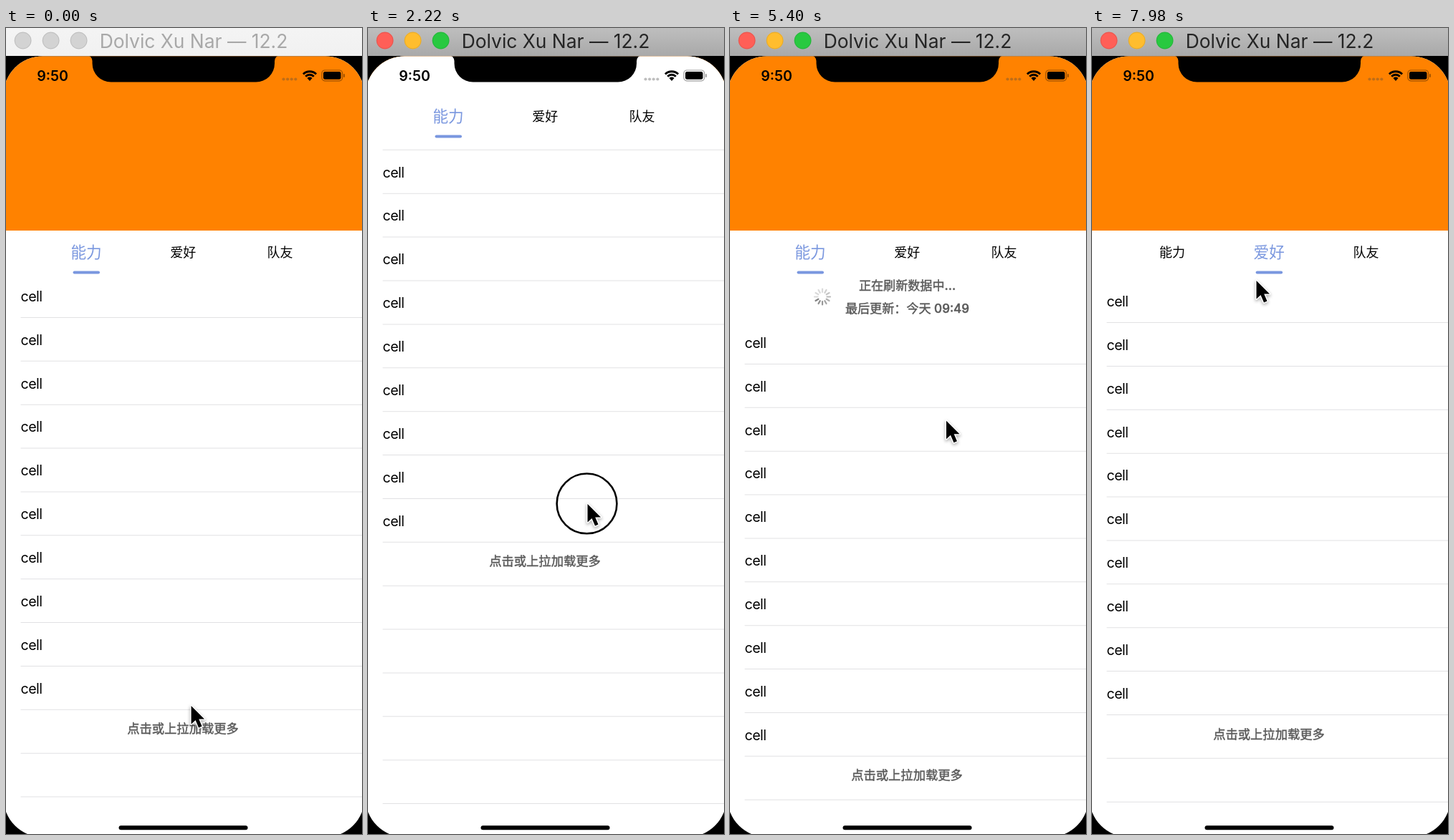
Recreate the animation shown at these times as an HTML page with a canvas. Size 497 px wide and 1126 px high, loop 8 s.

```html
<!DOCTYPE html>
<html lang="zh">
<meta charset="utf-8">
<style>
html, body { margin: 0; width: 100%; height: 100%; overflow: hidden; background: #000; }
canvas { display: block; }
</style>
<canvas id="stage" width="497" height="1126"></canvas>
<script>
const c = document.getElementById('stage').getContext('2d');
const LOOP = 8000, W = 497, H = 1126, ROW = 60.88;
const NAV = 93, HEAD = 283, FOLD = HEAD - NAV, TABS = 60.5, PULL = 65;
const LATIN = 'Inter, "Noto Sans CJK SC", "Noto Sans CJK", sans-serif';
const HAN = '"Noto Sans CJK SC", "Noto Sans CJK", Inter, sans-serif';
const BLUE = '#7a97df', GREY = '#5a5a5a';

// Keys: [time, values...]; a trailing 'ease' smooths the way into that key.
const scrollKeys = [
  [0, 0], [400, 0], [1020, 66], [2220, 234], [2400, 238], [2800, FOLD, 'ease'],
  [3250, FOLD], [3540, 124.6], [4100, 0, 'ease'], [4250, 0], [4620, -43],
  [5000, -70], [5100, -70], [5350, -PULL, 'ease'], [5750, -PULL], [6100, 0, 'ease'],
  [6500, 0], [6745, -PULL, 'ease'], [7250, -PULL], [7250, 0], [7500, -PULL, 'ease'],
  [7700, -PULL], [8054, 0, 'ease']
];
const tabKeys = [[0, 0], [6500, 0], [6720, 2, 'ease'], [7250, 2], [7470, 1, 'ease']];
const mouseKeys = [
  [0, 258, 946], [400, 282, 949], [1020, 291, 883], [2220, 306, 664], [2400, 308, 650],
  [3200, 320, 291, 'ease'], [3540, 325, 356], [4000, 318, 480], [4250, 308, 413, 'ease'],
  [4620, 305, 499], [5000, 300, 553], [5300, 300, 553], [6400, 361, 330, 'ease'],
  [6800, 361, 330], [7150, 240, 322, 'ease'], [7400, 240, 322], [7900, 229, 352, 'ease']
];
const presses = [[350, 2400], [3220, 4050], [4250, 5080], [6430, 6520], [7180, 7270]];
const refreshes = [[5080, 6100], [6500, 7250], [7250, 8054]];

const within = (spans, t) => spans.some(([a, b]) => t >= a && t < b);
const clamp = (v, lo, hi) => Math.min(hi, Math.max(lo, v));

function at(keys, t, n = 1) {
  const i = keys.findIndex(k => k[0] > t);
  if (i < 0) return keys[keys.length - 1][n];
  const a = keys[i - 1], b = keys[i];
  let u = (t - a[0]) / (b[0] - a[0]);
  if (b[b.length - 1] === 'ease') u = u * u * (3 - 2 * u);
  return a[n] + (b[n] - a[n]) * u;
}

function rect(x, y, w, h, color, r = 0) {
  c.fillStyle = color;
  c.beginPath();
  c.roundRect(x, y, w, h, r);
  c.fill();
}

function disc(x, y, r, color) {
  c.fillStyle = color;
  c.beginPath();
  c.arc(x, y, r, 0, 7);
  c.fill();
}

function ring(x, y, r, width, color) {
  c.strokeStyle = color;
  c.lineWidth = width;
  c.beginPath();
  c.arc(x, y, r, 0, 7);
  c.stroke();
}

// `bolder` thickens the strokes of the letters by that many pixels.
function text(s, x, mid, size, color = '#000', { font = HAN, weight = 400, align = 'center', gap = 0, bolder = 0 } = {}) {
  const y = mid + size * 0.37;
  c.font = `${weight} ${size}px ${font}`;
  c.letterSpacing = gap + 'px';
  c.textAlign = align;
  c.fillStyle = c.strokeStyle = color;
  c.fillText(s, x, y);
  if (bolder) {
    c.lineWidth = bolder;
    c.strokeText(s, x, y);
  }
}

function titleBar(active) {
  const g = c.createLinearGradient(0, 0, 0, 39);
  g.addColorStop(0, active ? '#bebebe' : '#f4f4f4');
  g.addColorStop(1, active ? '#a9a9a9' : '#f1f1f1');
  rect(0, 0, W, 39, g);
  ['#ff5f57', '#ffbd2e', '#28c940'].forEach((color, i) => {
    const x = 23.6 + 39 * i;
    disc(x, 17.5, 11.9, active ? color : '#d3d3d3');
    ring(x, 17.5, 11.4, 1, 'rgba(0,0,0,.1)');
  });
  text('Dolvic Xu Nar — 12.2', 262, 18.5, 26.4, active ? '#252525' : '#a8a8a8', { font: LATIN });
}

function spinner(x, y, t) {
  const step = Math.floor(t / 83);
  c.lineWidth = 2.2;
  c.lineCap = 'round';
  for (let i = 0; i < 12; i++) {
    const a = i * Math.PI / 6, age = (step - i + 1200) % 12;
    c.strokeStyle = `rgba(110,110,110,${0.85 - Math.min(age, 8) * 0.075})`;
    c.beginPath();
    c.moveTo(x + 6.5 * Math.cos(a), y + 6.5 * Math.sin(a));
    c.lineTo(x + 11 * Math.cos(a), y + 11 * Math.sin(a));
    c.stroke();
  }
  c.lineCap = 'butt';
}

function arrow(x, y, up) {
  c.save();
  c.translate(x, y);
  if (up) c.rotate(Math.PI);
  c.strokeStyle = '#606060';
  c.lineWidth = 2;
  c.stroke(new Path2D('M0-14V12M-8 5L0 13L8 5'));
  c.restore();
}

function list(top, t, pull) {
  for (let i = 0, y = top; y < H; i++, y += ROW) {
    rect(20.5, y + ROW - 0.5, W, 1, '#e1e1e3');
    if (i < 10) text('cell', 20.5, y + 31, 19.6, '#000', { font: LATIN, align: 'left', gap: -0.5 });
  }
  const note = { font: LATIN, weight: 500, bolder: 0.45 };
  text('点击或上拉加载更多', 247, top + 635.5, 17.3, GREY, note);
  if (pull <= 0) return;

  const busy = within(refreshes, t), ready = pull >= PULL;
  const state = busy ? '正在刷新数据中...' : ready ? '松开立即刷新' : '下拉可以刷新';
  text(state, 247.5, top - 49, 17.1, GREY, note);
  text('最后更新：今天 ' + (t < 5750 ? '09:49' : '09:50'), 247.5, top - 16.5, 17.1, GREY, note);
  if (busy) spinner(129, top - 33, t);
  else arrow(129, top - 32.5, ready);
}

function tabBar(y, pos, active) {
  rect(0, y, W, TABS, '#fff');
  ['能力', '爱好', '队友'].forEach((name, i) => {
    const on = i === active;
    text(name, 112 + 135.2 * i, y + 30.5, on ? 21.6 : 18, on ? BLUE : '#000');
  });
  rect(93.5 + 135.1 * pos, y + 56.6, 37.5, 4, BLUE, 2);
}

function notch() {
  c.fillStyle = '#000';
  c.beginPath();
  c.moveTo(112, 38);
  c.arcTo(120.5, 39, 120.5, 48, 8);
  c.arcTo(120.5, 75.5, 148, 75.5, 26);
  c.arcTo(375, 75.5, 375, 48, 26);
  c.arcTo(375, 39, 384, 38, 8);
  c.lineTo(384, 38);
  c.fill();
}

function statusBar() {
  text('9:50', 65, 67, 19.6, '#000', { font: LATIN, weight: 600 });
  for (let i = 0; i < 4; i++) disc(387.5 + 5.6 * i, 71.5, 2.1, 'rgba(70,70,70,.35)');

  c.strokeStyle = '#000';
  c.lineWidth = 2.9;
  for (const r of [12.8, 8.2]) {
    c.beginPath();
    c.arc(424, 73.5, r, -Math.PI * 0.75, -Math.PI * 0.25);
    c.stroke();
  }
  c.beginPath();
  c.moveTo(424, 74);
  c.arc(424, 73.5, 5, -Math.PI * 0.75, -Math.PI * 0.25);
  c.fillStyle = '#000';
  c.fill();

  c.strokeStyle = 'rgba(0,0,0,.4)';
  c.lineWidth = 1.2;
  c.beginPath();
  c.roundRect(441, 59, 28.5, 14.8, 4);
  c.stroke();
  rect(443, 61, 24.5, 10.8, '#000', 2.4);
  rect(471, 64, 1.8, 5, 'rgba(0,0,0,.4)', 1);
}

function pointer(x, y, pressed) {
  if (pressed) ring(x - 0.5, y + 0.5, 41.9, 2.6, '#000');
  c.save();
  c.translate(x + 0.5, y + 1);
  const shape = new Path2D('M0 0V25.500L6 20L10.500 30.500L15 28.500L10.700 18.500H18.500Z');
  c.lineWidth = 3;
  c.lineJoin = 'round';
  c.strokeStyle = '#fff';
  c.shadowColor = 'rgba(0,0,0,.35)';
  c.shadowBlur = 4;
  c.shadowOffsetY = 2;
  c.stroke(shape);
  c.shadowColor = 'transparent';
  c.fillStyle = '#000';
  c.fill(shape);
  c.restore();
}

function draw(now) {
  const t = now % LOOP;
  const scroll = at(scrollKeys, t);
  const head = HEAD - clamp(scroll, 0, FOLD);

  rect(0, 0, W, H, '#000');
  titleBar(t >= 350);

  // The screen is slightly wider and taller than the stage shows.
  c.save();
  c.beginPath();
  c.roundRect(-3.6, 39.4, W + 7.2, 1091, 55);
  c.clip();
  rect(0, 39, W, H, '#fff');
  list(HEAD + TABS - scroll, t, -scroll);
  rect(0, 39, W, head - 39, '#ff8200');
  tabBar(head, at(tabKeys, t), t < 6500 ? 0 : t < 7250 ? 2 : 1);
  rect(0, 39, W, NAV - 39, `rgba(255,255,255,${clamp(scroll / FOLD, 0, 1)})`);
  notch();
  statusBar();
  rect(157.5, 1114.3, 180, 6, '#000', 3);
  c.restore();

  pointer(at(mouseKeys, t), at(mouseKeys, t, 2), within(presses, t));
  requestAnimationFrame(draw);
}
requestAnimationFrame(draw);
</script>
</html>
```
